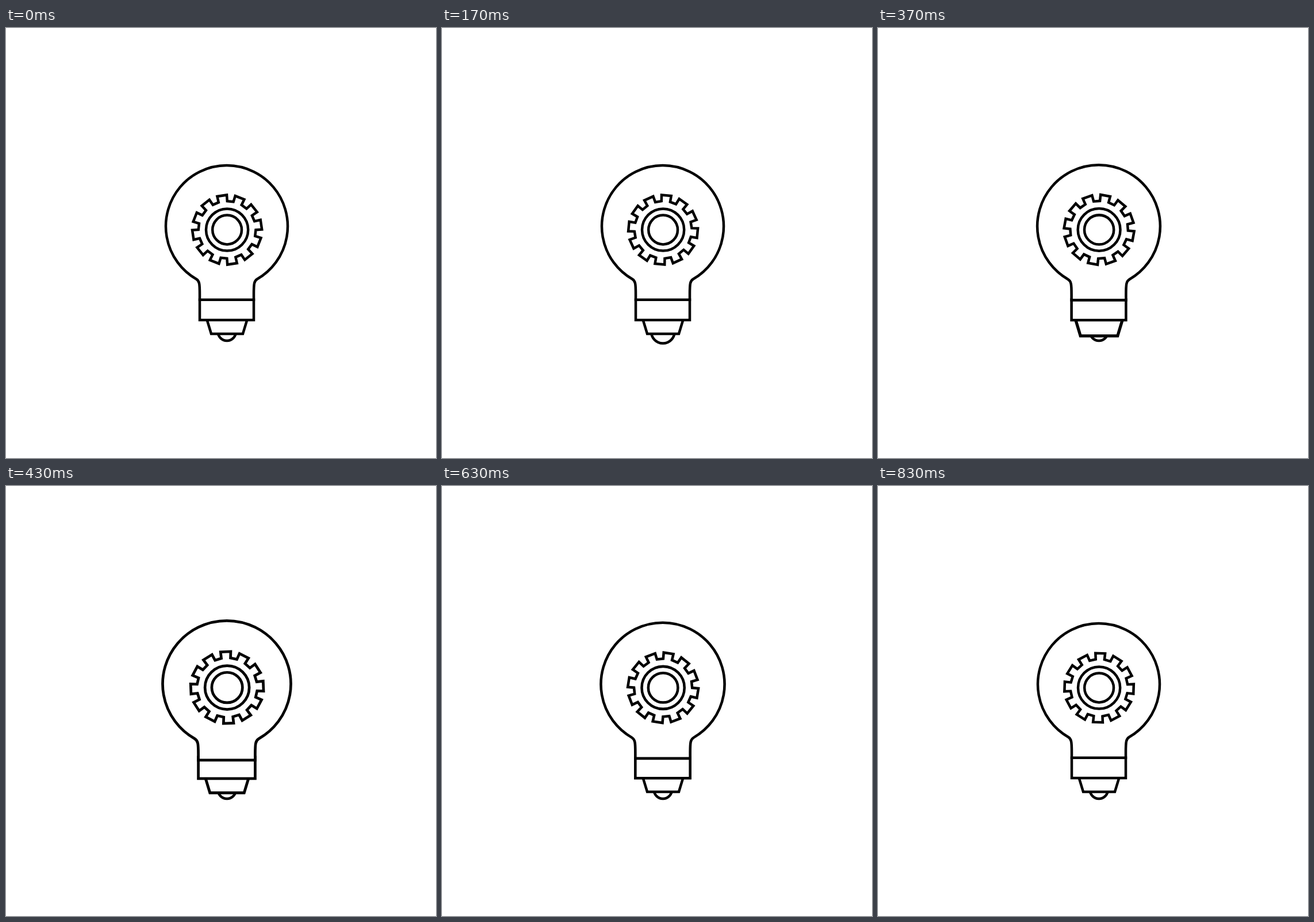
Animation, 748 px wide and 748 px high, one loop 1.5 s. Source, as an HTML page:

```html
<!DOCTYPE html>
<html lang="en">
<head>
<meta charset="utf-8">
<title>Light bulb with gear</title>
<style>
html, body { margin: 0; height: 100%; overflow: hidden; background: #fff; }
svg { display: block; width: 100%; height: 100%; }
</style>
</head>
<body>
<svg viewBox="0 0 748 748" fill="#fff" stroke="#000" stroke-width="4.5">
  <circle id="tip" cx="384.3" cy="528.3" r="15.7"/>
  <path id="cap" d="M347.3 500H421.7L412 532H357Z"/>
  <rect id="collar" x="337" y="472.7" width="94" height="35.3"/>
  <g id="bulb">
    <path d="M337 472.7V463C337 445 336.5 440 331 436.8A106 106 0 1 1 437 436.8C431.5 440 431 445 431 463V472.7Z"/>
    <g transform="translate(384.6 351)">
      <path id="gear"/>
      <circle r="36.6"/>
      <circle r="25.4"/>
    </g>
  </g>
</svg>
<script>
const LOOP = 1500, LAST = 25;
const $ = id => document.getElementById(id);

// gear outline: twelve teeth of [x, y] corners, each turned by 30 degrees
const tooth = [[-7.6, -49.3], [-8.4, -60], [8.4, -60], [7.6, -49.3]];
const corners = [];
for (let i = 0; i < 12; i++) {
  const a = i * Math.PI / 6, c = Math.cos(a), s = Math.sin(a);
  for (const [x, y] of tooth) corners.push([x * c - y * s, x * s + y * c]);
}
$('gear').setAttribute('d', 'M' + corners.join('L') + 'Z');

// [step, degrees]: the spin slows down to a stop
const spin = [[0, -8.5], [5, 65.5], [8, 104.5], [13, 147.7], [16, 171.3], [19, 189], [25, 212]];

function angle(k) {
  const i = Math.max(1, spin.findIndex(p => p[0] >= k));
  const [k0, a0] = spin[i - 1], [k1, a1] = spin[i];
  return a0 + (a1 - a0) * (k - k0) / (k1 - k0);
}

// smooth swell from 0 to 1 and back, beginning at step `start`
function pulse(k, start) {
  const d = k - start;
  const u = Math.max(0, d < 5 ? d / 5 : (10.5 - d) / 5.5);
  return u * u * (3 - 2 * u);
}

function scale(id, cx, cy, sx, sy = sx) {
  $(id).setAttribute('transform',
    `translate(${cx} ${cy}) scale(${sx} ${sy}) translate(${-cx} ${-cy})`);
}

function draw(t) {
  // 30 steps per second, on a 10 ms clock
  const k = Math.min(LAST, Math.floor((Math.floor(t / 10) + .5) * .3));
  const swell = .08 * pulse(k, 10);
  $('tip').setAttribute('r', 15.7 + 4.6 * pulse(k, 0));
  scale('cap', 384.5, 511, 1 + .19 * pulse(k, 5));
  scale('collar', 384, 490.4, 1 + swell);
  scale('bulb', 384, 362, 1 + swell, 1 + .73 * swell);
  $('gear').setAttribute('transform', `rotate(${angle(k)})`);
}

const begin = performance.now();
function tick() {
  draw((performance.now() - begin) % LOOP);
  requestAnimationFrame(tick);
}
tick();
</script>
</body>
</html>
```
